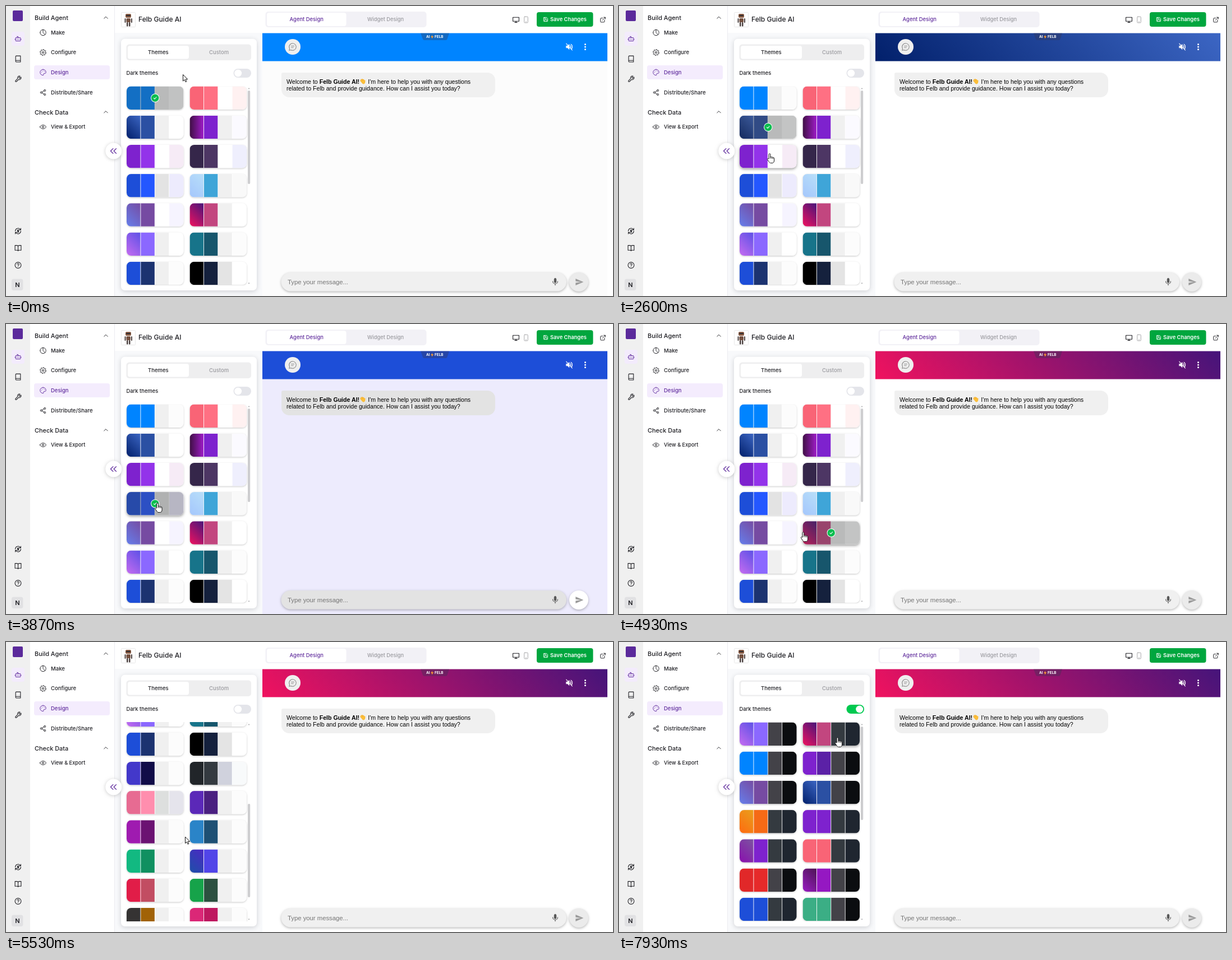
An HTML page with a canvas that plays this animation: 1082 px wide and 518 px high, repeating every 8 s.

```html
<!DOCTYPE html>
<html lang="en">
<head>
<meta charset="utf-8">
<title>Theme picker</title>
<style>
html, body { margin: 0; width: 100%; height: 100%; overflow: hidden; background: #fff; }
canvas { position: absolute; left: 0; top: 0; width: 1082px; height: 518px; }
span { position: absolute; line-height: 20px; white-space: pre; font-family: Inter, "Open Sans", sans-serif; font-weight: 500; }
span.chat { font-family: "Liberation Sans", Arial, sans-serif; font-weight: 400; }
</style>
</head>
<body>
<canvas id="scene"></canvas>
<div id="labels"></div>
<canvas id="pointer"></canvas>
<script>
const W = 1082, H = 518, LOOP = 8000, STEP = 1000 / 15;
const dpr = window.devicePixelRatio || 1;

function context(id) {
  const c = document.getElementById(id);
  c.width = W * dpr;
  c.height = H * dpr;
  const ctx = c.getContext('2d');
  ctx.scale(dpr, dpr);
  return ctx;
}
const g = context('scene'), top2d = context('pointer');

// ---- text: x, vertical centre, string, size, colour, extra style
const INK = '#1f1f24', PURPLE = '#5f2b9c', GREY = '#9a9a9f';
function label(x, y, text, size, color = INK, weight = '', cls = '') {
  const s = document.createElement('span');
  s.textContent = text;
  s.className = cls;
  s.style.cssText = `left:${x}px;top:${y - 10}px;font-size:${size}px;color:${color};` +
    (weight && `font-weight:${weight}`);
  document.getElementById('labels').append(s);
}
label(51, 20.5, 'Build Agent', 10.9);
label(51, 189.5, 'Check Data', 10.9);
label(80, 47.5, 'Make', 9.6);
label(80, 83, 'Configure', 9.5);
label(80, 118.5, 'Design', 9.5, PURPLE);
label(80, 154.5, 'Distribute/Share', 9.6);
label(80, 216, 'View & Export', 9.2);
label(16.3, 497.5, 'N', 11, INK, 600);
label(236, 24, 'Felb Guide AI', 12.1);
label(505.5, 24, 'Agent Design', 9.4, PURPLE);
label(644, 24, 'Widget Design', 9.3, GREY);
label(970, 24, 'Save Changes', 9.4, '#fff', 600);
label(253, 83, 'Themes', 9.5);
label(362, 83, 'Custom', 9.5, GREY);
label(214.5, 120, 'Dark themes', 9.4);
label(749, 55, 'AI', 6.4, '#fff', 700);
label(764, 55, 'FELB', 6.4, '#fff', 700);
label(500, 134.5, 'Welcome to ', 10.6, '#000', '', 'chat');
label(558.7, 134.5, 'Felb Guide AI!', 10.6, '#000', 700, 'chat');
label(645.3, 134.5, "I'm here to help you with any questions", 10.6, '#000', '', 'chat');
label(500, 147, 'related to Felb and provide guidance. How can I assist you today?', 10.6, '#000', '', 'chat');
label(502, 493, 'Type your message...', 11.3, '#757575', '', 'chat');

// ---- themes: header, user bubble, agent bubble, background
const BLUE = '45:02206b>3c66c4 2b50a3', LILAC = '45:667eea>764ba2 764ba2',
  PINK = '45:f0125f>45147a c2467f', ORCHID = '45:c56cf0>5b50e6 8b68ff';
const A = ' 434248 0b0d10', B = ' 343a40 1f2630';
const split = (list, rest) => list.map(s => {
  const c = s.split(' ');
  return c.concat(rest.slice(c.length - 2));
});
const light = split([
  '0084ff 0084ff', 'f96476 ff7083 fff fff1f1',
  BLUE + ' f0f0f0 fff', '90:3f0f44>a21ccc 7e22ce f0f0f0 fbfaff',
  '7e22ce 9333ea fff f6ebf6', '35264a 4d3664 fff efeffd',
  '1d4ed8 2457ff e3e3e3 edebfd', '45:a4c6fc>b8dff9 3fa5d8 f0f0f0 f9f9f9',
  LILAC + ' fff f6f4ff', PINK + ' f0f0f0 fff',
  ORCHID + ' f0f0f0 fff', '17748a 17566c',
  '1d4ed8 1c3370', '000 15213d e4e4e4 fff',
  '4338ca 110c48', '212529 343a40 d0d2dd f8fafb',
  'e76b92 ff8eae dddfde e5e4ec', '5b28b8 4a2080',
  '9f1bb0 6b1272', '2a84c8 1e5074',
  '12b981 109060', '45:1d50a8>4c28c4 5145e8',
  'e11d48 c24d62', '16a34a 2c5040',
  '353333 a16207', 'db2777 be1860',
  '0f766e 134e4a', '7c2d12 9a3412'
], ['f0f0f0', 'fcfcfc']);
const dark = split([
  ORCHID + A, PINK + B, '0084ff 0084ff' + A, '7e22ce 5b21a6' + A,
  LILAC + A, BLUE + A, '45:ff6a10>e8a01c f56a16' + B, '7e22ce 7e22ce' + B,
  '45:8a0fae>7b55a0 7e22ce' + B, 'f96476 f96476' + B, 'e12829 e62a2a' + A,
  '45:9a1cc4>4a1450 9518c2' + A, '1d4ed8 1d4ed8' + B, '3bae85 3bae85' + A
], []);

// ---- timeline
const picks = [[0, 0], [890, 1], [1400, 3], [2130, 2], [2720, 4], [3530, 6], [4190, 7], [4650, 9]];
const moves = [
  [0, 315.5, 122.5], [300, 315.5, 122.5], [670, 342, 165], [1000, 342, 166], [1330, 344, 217],
  [1730, 343, 218], [2060, 271, 217], [2230, 270, 218], [2530, 268.5, 264], [2900, 268.5, 264],
  [3270, 270, 320], [3900, 270, 320], [4130, 344, 321], [4330, 344, 322], [4600, 344, 371],
  [4780, 343, 373], [4933, 328.5, 372], [5070, 320, 350], [5530, 319.5, 348], [6130, 319.5, 348],
  [6533, 321, 265], [6870, 409.5, 118.5], [7000, 409.5, 118.5], [7130, 413, 121],
  [7380, 413, 121], [7580, 410, 80], [7920, 389.5, 171]
];
const scrolls = [[0, 0], [5060, 0], [5533, 295], [5730, 368], [5930, 368], [6430, 0]];
const DARK_AT = 7333;

function track(keys, t) {
  let i = 0;
  while (i < keys.length - 1 && keys[i + 1][0] <= t) i++;
  const a = keys[i], b = keys[i + 1];
  if (!b) return a.slice(1);
  const u = (t - a[0]) / (b[0] - a[0]), e = u * u * (3 - 2 * u);
  return a.slice(1).map((v, k) => v + (b[k + 1] - v) * e);
}

// ---- drawing helpers
function box(x, y, w, h, r, fill, stroke) {
  g.beginPath();
  g.roundRect(x, y, w, h, r);
  if (fill) { g.fillStyle = fill; g.fill(); }
  if (stroke) { g.strokeStyle = stroke; g.lineWidth = 1; g.stroke(); }
}
function disc(x, y, r, fill) {
  g.beginPath();
  g.arc(x, y, r, 0, 7);
  g.fillStyle = fill;
  g.fill();
}
function shaded(color, blur, dy, draw) {
  g.save();
  g.shadowColor = color;
  g.shadowBlur = blur * dpr;
  g.shadowOffsetY = dy * dpr;
  draw();
  g.restore();
}
function paint(spec, x, y, w, h) {
  if (!spec.includes('>')) return '#' + spec;
  const [deg, from, to] = spec.split(/[:>]/);
  const a = deg * Math.PI / 180, sx = Math.sin(a), sy = -Math.cos(a);
  const half = (w * Math.abs(sx) + h * Math.abs(sy)) / 2;
  const cx = x + w / 2, cy = y + h / 2;
  const grad = g.createLinearGradient(cx - sx * half, cy - sy * half, cx + sx * half, cy + sy * half);
  grad.addColorStop(0, '#' + from);
  grad.addColorStop(1, '#' + to);
  return grad;
}
// Icons live on a 24-unit grid.
const cache = {};
function icon(d, x, y, size, color, lw = 2, fill) {
  const p = cache[d] || (cache[d] = new Path2D(d)), k = size / 24;
  g.save();
  g.translate(x - size / 2, y - size / 2);
  g.scale(k, k);
  g.lineCap = g.lineJoin = 'round';
  if (fill) { g.fillStyle = fill; g.fill(p); }
  if (color) { g.strokeStyle = color; g.lineWidth = lw; g.stroke(p); }
  g.restore();
}
const ring = (x, y, r) => `M${x - r} ${y}a${r} ${r} 0 1 0 ${2 * r} 0a${r} ${r} 0 1 0 ${-2 * r} 0`;
const gear = (() => {
  let d = '';
  for (let i = 0; i < 32; i++) {
    const r = i % 4 < 2 ? 10.5 : 7.8, a = (i + .5) * Math.PI / 16;
    d += (i ? 'L' : 'M') + (12 + r * Math.cos(a)) + ' ' + (12 + r * Math.sin(a));
  }
  return d + 'Z' + ring(12, 12, 3);
})();
const I = {
  up: 'M5 16L12 9L19 16',
  bot: 'M5 8h14a2 2 0 0 1 2 2v8a2 2 0 0 1-2 2H5a2 2 0 0 1-2-2v-8a2 2 0 0 1 2-2zM12 8V4H8M1 14h2M21 14h2M9 13v2M15 13v2',
  book: 'M6 2h14v20H6a2 2 0 0 1-2-2V4a2 2 0 0 1 2-2zM4 19a2 2 0 0 1 2-2h14',
  wrench: 'M14.7 6.3a1 1 0 0 0 0 1.4l1.6 1.6a1 1 0 0 0 1.4 0l3.8-3.8a6 6 0 0 1-7.9 7.9l-6.9 6.9a2.1 2.1 0 0 1-3-3l6.9-6.9a6 6 0 0 1 7.9-7.9z',
  money: 'M3 12a9 9 0 0 1 15-6.7L21 8M21 3v5h-5M21 12a9 9 0 0 1-15 6.7L3 16M3 21v-5h5M14.5 9.5C13 8 9.5 8.500 9.500 10.300C9.500 12.500 14.500 11.500 14.500 13.800C14.500 15.500 11 16 9.500 14.500M12 7.500v9',
  read: 'M12 6a4 4 0 0 0-4-3H2v16h7a3 3 0 0 1 3 2a3 3 0 0 1 3-2h7V3h-6a4 4 0 0 0-4 3zM12 6v15',
  help: ring(12, 12, 10) + 'M9 9a3 3 0 0 1 6 1c0 2-3 2.500-3 4M12 17.500v.1',
  pie: ring(12, 12, 10) + 'M12 2v10l7 7',
  gear,
  palette: 'M12 2a10 10 0 0 0 0 20c2 0 2.500-1.500 1.700-3c-.8-1.700.3-3 2-3H18c2.500 0 4-1.500 4-4.500C22 6 17.500 2 12 2zM7 12v.1M9 7.500v.1M14 6.500v.1M17.500 10v.1',
  share: ring(18, 5, 3) + ring(6, 12, 3) + ring(18, 19, 3) + 'M8.600 13.500l6.800 4M15.400 6.500l-6.800 4',
  eye: 'M1.500 12C6 3 18 3 22.500 12C18 21 6 21 1.500 12z' + ring(12, 12, 3),
  monitor: 'M2 4h20v13H2zM8 21h8M12 17v4',
  phone: 'M8 2h8a2 2 0 0 1 2 2v16a2 2 0 0 1-2 2H8a2 2 0 0 1-2-2V4a2 2 0 0 1 2-2zM11 18.500h2',
  save: 'M4 3h12l5 5v11a2 2 0 0 1-2 2H5a2 2 0 0 1-2-2V4zM7 21v-8h10v8M7 3v5h8',
  open: 'M18 13v6a2 2 0 0 1-2 2H5a2 2 0 0 1-2-2V8a2 2 0 0 1 2-2h6M15 3h6v6M10 14L21 3',
  back: 'M11 5l-7 7l7 7M20 5l-7 7l7 7',
  talk: 'M12 2a10 10 0 1 1-5 18.700L2 22l1.300-5A10 10 0 0 1 12 2zM8 9.500h8M8 14h6',
  mute: 'M3 9h4l5-5v16l-5-5H3z',
  waves: 'M15 8a5 5 0 0 1 1 7M17 4a9 9 0 0 1 2 14M3 2l18 20',
  mic: 'M12 2a3 3 0 0 1 3 3v7a3 3 0 0 1-6 0V5a3 3 0 0 1 3-3z',
  stand: 'M5 11a7 7 0 0 0 14 0M12 18v4',
  plane: 'M2 21L23 12L2 3V10L17 12L2 14Z',
  bolt: 'M14 1L4 14h7l-2 9l11-13h-8z',
  tick: 'M5 12.500l5 5L19 7.500',
  palm: 'M5 10L12 19Q16 22 20 18Q22 14 20 7',
  fingers: 'M12 15L5 8M14 13L7 4.500M16 12L11 3.500M18 13L15.500 5M18 16L20.500 9'
};

function sidebar() {
  box(0, 0, 43, H, 0, '#f0f0f0');
  box(12, 8, 18, 19, 2, '#5b2a9b');
  box(10, 46, 23, 25, 4, '#f3ebfc');
  icon(I.bot, 21.5, 58.5, 12, PURPLE);
  [['book', 94.5], ['wrench', 130.5], ['money', 402], ['read', 432.5], ['help', 463]]
    .forEach(([n, y]) => icon(I[n], 21.5, y, 13, INK));
  box(10, 487.5, 20.5, 20.5, 4, '#e1e1e3');

  box(50, 106, 135, 25, 4, '#f4ecfd');
  [['pie', 47.5], ['gear', 83], ['palette', 118.5], ['share', 154.5], ['eye', 216]]
    .forEach(([n, y]) => icon(I[n], 66, y, 12.5, n == 'palette' ? PURPLE : INK, 1.8));
  icon(I.up, 178, 20.5, 11, INK);
  icon(I.up, 178, 189, 11, INK);
}

function topBar() {
  box(193, 48, 264, 470, 0, '#f8f9fb');
  box(193, 0, 1, H, 0, '#ececf0');
  box(205.5, 11.5, 25, 26, 1, '#fff', '#e8e8e8');
  box(213, 14, 10, 7, 2, '#8b5d45');
  box(214, 16, 8, 2, 1, '#2b2a2c');
  box(214.5, 22, 7.5, 7, 1.5, '#74503f');
  box(211.5, 22, 2, 8, 1, '#4c4241');
  box(223, 22, 2, 8, 1, '#4c4241');
  box(215, 29, 2.5, 7.5, 1, '#4c4241');
  box(219, 29, 2.5, 7.5, 1, '#4c4241');

  box(462.500, 10, 287, 28, 5, '#f2f1f6');
  box(465, 12, 141.5, 24, 4, '#fff');
  icon(I.monitor, 909, 24.5, 13, INK);
  icon(I.phone, 927, 24.5, 13, '#a5a5a8', 1.8);
  box(946, 11, 100.5, 26, 4, '#00a63e');
  icon(I.save, 962, 24, 9.5, '#fff', 2.2);
  icon(I.open, 1064, 24.5, 11.5, INK);
}

function card(theme, x, y, chosen, hover) {
  const w = 101.5, h = 41.5, col = w / 4;
  shaded(`rgba(0,0,0,${hover ? .4 : .22})`, hover ? 5 : 3, hover ? 2 : 1, () => box(x, y, w, h, 8, '#fff'));
  g.save();
  g.beginPath();
  g.roundRect(x, y, w, h, 8);
  g.clip();
  theme.forEach((c, i) => {
    const cx = x + i * col;
    g.fillStyle = paint(c, cx, y, col, h);
    g.fillRect(cx, y, col + (i == 3 ? 1 : -.9), h);
  });
  if (chosen) {
    g.fillStyle = 'rgba(62,66,66,.31)';
    g.fillRect(x, y, w, h);
  }
  g.restore();
  if (chosen) {
    const mx = x + w / 2, my = y + h / 2;
    disc(mx, my, 7.7, '#fff');
    disc(mx, my, 6.7, '#06bd4f');
    icon(I.tick, mx, my, 8, '#fff', 3.2);
  }
}

const LEFT = [215, 327.5], ROW = 52.2, TOP = 143.5;
function cardAt(x, y, scroll) {
  if (y < TOP || y > 498) return -1;
  const r = (y - TOP + scroll) / ROW, c = x >= LEFT[1] ? 1 : 0;
  const inside = x >= LEFT[c] && x < LEFT[c] + 101.5 && r % 1 < 41.5 / ROW;
  return inside ? Math.floor(r) * 2 + c : -1;
}

function panel(isDark, chosen, hover, scroll) {
  shaded('rgba(40,45,60,.2)', 9, 2, () => box(205, 58.5, 242, 449.5, 7, '#fff'));
  box(214.5, 68.5, 222.5, 28.5, 5, '#eeeeef');
  box(217, 71, 109, 23.5, 4, '#fff');
  box(405.5, 112, 31.500, 16, 8, isDark ? '#00c950' : '#e4e5ea');
  disc(isDark ? 428.700 : 413.700, 120, 6.5, '#fff');

  g.save();
  g.beginPath();
  g.rect(206, 143, 225, 356);
  g.clip();
  (isDark ? dark : light).forEach((theme, i) => {
    const y = TOP + (i >> 1) * ROW - scroll;
    if (y > 90 && y < 500) card(theme, LEFT[i & 1], y, !isDark && i == chosen, i == hover);
  });
  g.restore();

  box(431, 151 + scroll * .468, 4.2, 167, 2, '#cdcdcf');
  icon('M4 18L12 7L20 18Z', 433, 147, 5, '', 0, '#b0b0b2');
  icon('M4 7L12 18L20 7Z', 433, 495.500, 5, '', 0, '#b0b0b2');
}

function chat([head, , bubble, back]) {
  box(457, 48, 615, 470, 0, '#' + back);
  box(457, 48.5, 615, 50, 0, paint(head, 457, 48.5, 615, 50));
  g.fillStyle = 'rgba(55,55,80,.36)';
  g.fill(new Path2D('M739 48.500H790L786.500 59Q786 61 783.500 61H746Q743.500 61 743 59Z'));
  icon(I.bolt, 759.700, 55, 8, '', 0, '#ff9d2e');

  disc(511, 73, 14, '#efefef');
  icon(I.talk, 511, 73, 15, '#8b8b8b', 1.7);
  icon(I.mute, 1004, 73, 14, '#fff', 1, '#fff');
  icon(I.waves, 1004, 73, 14, '#fff', 2);
  [-4.500, 0, 4.500].forEach(d => disc(1032.500, 73 + d, 1.500, '#fff'));

  box(491, 119, 381, 44, [3, 14, 14, 14], '#' + bubble);
  icon(I.fingers, 635.500, 135, 12, '#f7b32b', 3.2);
  icon(I.palm, 635.500, 135, 12, '#f7b32b', 1, '#fbbf3a');

  const send = bubble == 'f0f0f0' ? '#ebebeb' : '#fff';
  shaded('rgba(0,0,0,.28)', 4, 1.500, () => {
    box(490.500, 476, 508.500, 33.500, 17, '#' + bubble);
    disc(1021, 493, 17, send);
  });
  icon(I.mic, 979, 492.500, 15, '#555', 1, '#555');
  icon(I.stand, 979, 492.500, 15, '#555', 1.8);
  icon(I.plane, 1022, 493, 16, '', 0, '#9b9b9b');
}

const arrow = new Path2D('M0 0V11.600L2.700 9.100L4.500 13.200L6.400 12.400L4.600 8.400H8.200Z');
const hand = new Path2D('M-1.400 9V1.200a1.400 1.400 0 0 1 2.800 0V6a1.300 1.300 0 0 1 2.400 .3a1.300 1.300 0 0 1 2.300 .5' +
  'a1.200 1.200 0 0 1 2 .8V12c0 3-1.500 4.500-3.500 4.500H2c-1.500 0-2-.5-3-2L-3.800 10.500c-1-1.600.6-2.800 1.600-1.600z');
function cursor(x, y, link) {
  const c = top2d, p = link ? hand : arrow;
  c.clearRect(0, 0, W, H);
  c.save();
  c.translate(x, y);
  c.fillStyle = '#fff';
  c.strokeStyle = '#111';
  c.lineWidth = 1;
  c.lineJoin = 'round';
  c.fill(p);
  c.stroke(p);
  if (link) c.stroke(new Path2D('M1.400 6V8.500M3.800 6.600V8.700M6.100 7.200V9'));
  c.restore();
}

function draw(t) {
  const [x, y] = track(moves, t), [scroll] = track(scrolls, t);
  const isDark = t >= DARK_AT;
  const chosen = picks.filter(p => p[0] <= t).pop()[1];
  const hover = cardAt(x, y, scroll);
  const onSwitch = x > 405 && x < 437 && y > 112 && y < 128;
  const onTab = x > 217 && x < 437 && y > 69 && y < 97;

  box(0, 0, W, H, 0, '#fff');
  sidebar();
  topBar();
  panel(isDark, chosen, hover, scroll);
  chat(light[chosen]);
  shaded('rgba(0,0,0,.2)', 6, 1, () => disc(191.800, 259, 14.500, '#fff'));
  icon(I.back, 191.500, 259, 15, PURPLE, 2.2);
  cursor(x, y, hover >= 0 || onSwitch || onTab);
}

const start = performance.now();
let last = -1;
function tick() {
  const step = Math.floor(((performance.now() - start) % LOOP + 4) / STEP) % 120;
  if (step !== last) draw((last = step) * STEP);
  requestAnimationFrame(tick);
}
tick();
</script>
</body>
</html>
```
